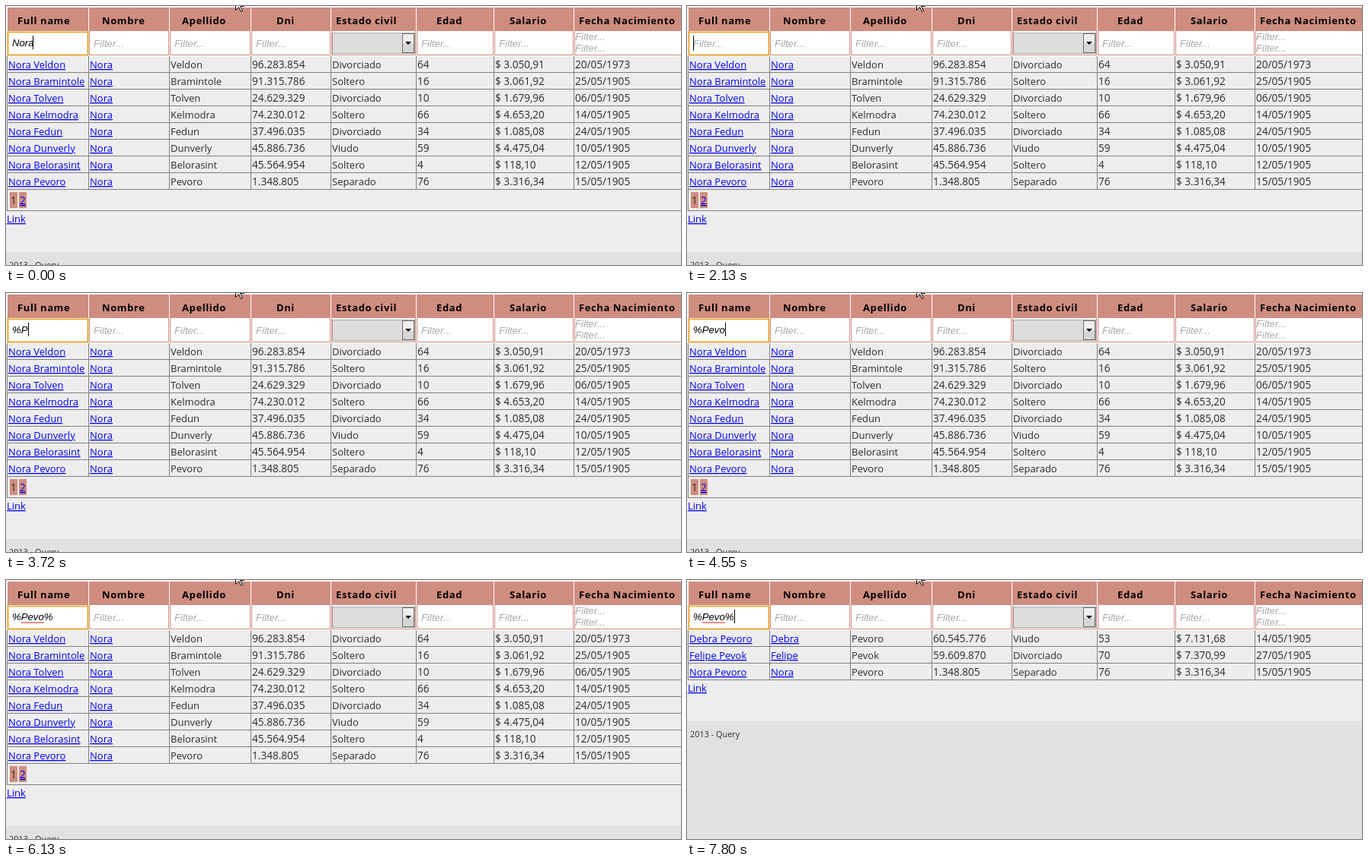
Write an HTML page that moves like this. It is 886 px wide and 341 px high and loops after 8000 ms.

```html
<!DOCTYPE html>
<html lang="es">
<head>
<meta charset="utf-8">
<title>Query</title>
<style>
  html, body { margin: 0; width: 100%; height: 100%; overflow: hidden; background: #ededed; }
  svg { display: block; width: 886px; height: 341px; }
  rect { shape-rendering: crispEdges; }
  text { font: 13px "Open Sans", "Noto Sans", sans-serif; fill: #2b2b2b; white-space: pre; }
  .head { font-weight: 700; letter-spacing: .6px; fill: #000; }
  .num { font-size: 13.6px; }
  .link { fill: #00e; text-decoration: underline; }
  .input { font: italic 13.2px "Liberation Sans", Arial, sans-serif; fill: #000; }
  .hint { fill: #a9a9a9; }
  .foot { font-size: 10.9px; }
  .ring { fill: none; stroke: #e59700; }
</style>
</head>
<body>
<svg id="stage" viewBox="0 0 886 341"></svg>
<script>
const NS = 'http://www.w3.org/2000/svg';
const stage = document.getElementById('stage');
const SALMON = '#cf8d7f', LINE = '#808080', PAGE = '#ededed';

function add(parent, tag, attrs = {}, content) {
  const node = document.createElementNS(NS, tag);
  for (const key in attrs) node.setAttribute(key, attrs[key]);
  if (content !== undefined) node.textContent = content;
  return parent.appendChild(node);
}
const box = (parent, x, y, width, height, fill) => add(parent, 'rect', { x, y, width, height, fill });
const label = (parent, x, y, content, cls = '') => add(parent, 'text', { x, y, class: cls }, content);
const show = (node, on) => node.setAttribute('visibility', on ? 'visible' : 'hidden');

const edges = [1, 108, 214, 321, 426, 538, 640, 745, 887];
const headers = [
  ['Full name', 15], ['Nombre', 126], ['Apellido', 231], ['Dni', 355],
  ['Estado civil', 433], ['Edad', 565], ['Salario', 661], ['Fecha Nacimiento', 752]
];

const allRows = `Nora|Veldon|96.283.854|Divorciado|64|3.050,91|20/05/1973
Nora|Bramintole|91.315.786|Soltero|16|3.061,92|25/05/1905
Nora|Tolven|24.629.329|Divorciado|10|1.679,96|06/05/1905
Nora|Kelmodra|74.230.012|Soltero|66|4.653,20|14/05/1905
Nora|Fedun|37.496.035|Divorciado|34|1.085,08|24/05/1905
Nora|Dunverly|45.886.736|Viudo|59|4.475,04|10/05/1905
Nora|Belorasint|45.564.954|Soltero|4|118,10|12/05/1905
Nora|Pevoro|1.348.805|Separado|76|3.316,34|15/05/1905`.split('\n');
const foundRows = [
  'Debra|Pevoro|60.545.776|Viudo|53|7.131,68|14/05/1905',
  'Felipe|Pevok|59.609.870|Divorciado|70|7.370,99|27/05/1905',
  allRows[7]
];

function drawResults(rows, hasPager) {
  const group = add(stage, 'g');
  const end = 65 + rows.length * 22;
  rows.forEach((row, i) => {
    const [first, last, dni, status, age, pay, date] = row.split('|');
    [`${first} ${last}`, first, last, dni, status, age, `$ ${pay}`, date].forEach((value, col) => {
      const cls = col < 2 ? 'link' : col === 3 || col > 4 ? 'num' : '';
      label(group, edges[col] + 2, 82 + i * 22, value, cls);
    });
    box(group, 1, 87 + i * 22, 885, 1, LINE);
  });
  edges.forEach(x => box(group, x, 66, 1, end - 65, LINE));
  let bottom = end;
  if (hasPager) {
    bottom = 269;
    box(group, 1, end, 1, bottom - end, LINE);
    box(group, 1, bottom, 885, 1, LINE);
    box(group, 5, 245, 10, 21, SALMON);
    box(group, 17, 245, 10, 21, SALMON);
    label(group, 6, 261, '1', 'num');
    label(group, 18, 261, '2', 'num link');
  }
  label(group, 1, bottom + 16, 'Link', 'link');
  box(group, 0, bottom + 55, 886, 341, '#e1e1e1');
  label(group, 4, bottom + 76, '2013 - Query', 'foot');
  return group;
}

function drawHeader() {
  box(stage, 1, 1, 885, 65, '#fff');
  headers.forEach(([title, x], col) => {
    const left = edges[col] + 1, width = edges[col + 1] - left;
    box(stage, left, 2, width, 63, SALMON);
    box(stage, left + 1, 33, width - 2, 31, '#fff');
    label(stage, x, 24, title, 'head');
    if (col && col !== 4 && col < 7) label(stage, left + 6, 54, 'Filter...', 'input hint');
  });
  for (const y of [45, 60]) label(stage, 747, y, 'Filter...', 'input hint');

  // Drop-down list
  box(stage, 428, 35, 109, 28, '#a9a9a9');
  box(stage, 429, 36, 107, 26, '#ddd');
  box(stage, 520, 36, 16, 26, '#707070');
  box(stage, 521, 37, 14, 12, '#efefef');
  box(stage, 521, 49, 14, 12, '#d6d6d6');
  add(stage, 'path', { d: 'M524 47h8l-4 4z', fill: '#000' });

  // Focus ring: soft outer glow, firm inner line
  const ring = { x: 2, y: 34, width: 105.5, height: 30.5, rx: 1, class: 'ring' };
  add(stage, 'rect', { ...ring, 'stroke-width': 3, opacity: .3 });
  add(stage, 'rect', { ...ring, 'stroke-width': 1, opacity: .75 });
  // Mouse pointer, cut by the top edge
  add(stage, 'path', {
    d: 'M301.5-10.5v16l4-4 3 6 2-1-3-6h5z', fill: '#fff', stroke: '#000'
  });
}

const results = drawResults(allRows, true);
const filtered = drawResults(foundRows, false);
drawHeader();

const selection = box(stage, 8, 39, 27, 18, '#39f');
const hint = label(stage, 8, 54, 'Filter...', 'input hint');
const typed = label(stage, 8, 53, '', 'input');
const caret = box(stage, 35, 39, 1, 18, '#000');
let wave = 'M20 56.5';
for (let x = 22; x <= 50; x += 2) wave += `L${x} ${x % 4 ? 55.5 : 56.5}`;
const squiggle = add(stage, 'path', { d: wave, fill: 'none', stroke: '#f22' });

// Start time, field text, caret position (0 = hidden), mode
const steps = [
  [0, 'Nora', 35],
  [150, 'Nora', 0],
  [580, 'Nora', 35],
  [1140, 'Nora', 0, 'selected'],
  [2130, '', 8],
  [2720, '%', 20],
  [3160, '%', 0],
  [3720, '%P', 29],
  [4120, '%Pe', 36],
  [4550, '%Pevo', 50],
  [5140, '%Pevo', 0],
  [5570, '%Pevo%', 62],
  [5700, '%Pevo%', 62, 'misspelt'],
  [6130, '%Pevo%', 0, 'misspelt'],
  [6690, '%Pevo%', 62],
  [6840, '%Pevo%', 62, 'misspelt'],
  [7250, '%Pevo%', 0, 'misspelt'],
  [7800, '%Pevo%', 62, 'misspelt']
];

let current;
function frame() {
  const time = performance.now() % 8000;
  const step = steps.findLast(([start]) => start <= time);
  if (step !== current) {
    current = step;
    const [start, text, caretX, mode] = step;
    typed.textContent = text;
    typed.style.fill = mode === 'selected' ? '#fff' : '#000';
    caret.setAttribute('x', caretX);
    caret.setAttribute('height', text ? 18 : 20);
    show(caret, caretX);
    show(hint, !text);
    show(selection, mode === 'selected');
    show(squiggle, mode === 'misspelt');
    show(results, start < 6690);
    show(filtered, start >= 6690);
  }
  requestAnimationFrame(frame);
}
frame();
</script>
</body>
</html>
```
